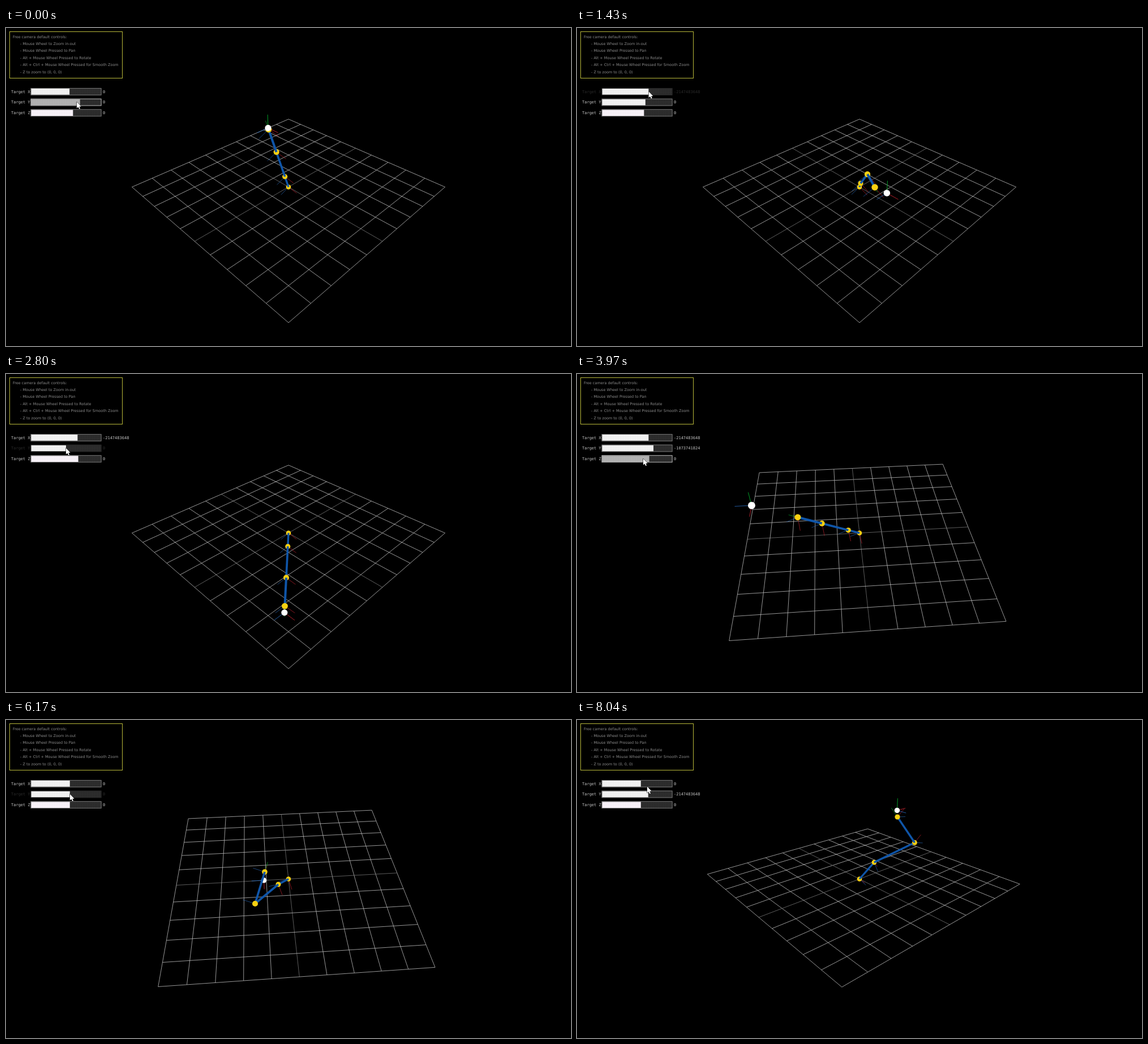
An HTML page with a canvas for the animation above (8.07 s loop, 998 by 561 pixels).

```html
<!DOCTYPE html>
<html lang="en">
<head>
<meta charset="utf-8">
<title>Robot arm reaching for a target</title>
<style>
  html, body { margin: 0; width: 100%; height: 100%; overflow: hidden; background: #000; }
  canvas { position: absolute; left: 0; top: 0; }
  span { position: absolute; white-space: pre; line-height: 10px; }
  .help { font: 6.5px/10px "DejaVu Sans", sans-serif; color: #8c8c8c; }
  .ui { font: 7px/10px "DejaVu Sans Mono", monospace; color: #c4c4c4; }
</style>
</head>
<body>
<canvas id="stage" width="998" height="561"></canvas>
<script>
const LOOP = 8070, W = 998, H = 561, UI = 0.62375;
const FOCAL = H / 2 / Math.tan(Math.PI / 8), DIST = Math.sqrt(300);
const LENGTHS = [1, 2, 1.5], RADIUS = 0.11;
const RGB = ['#d82834', '#00c832', '#2a6fc4'];
const ctx = document.getElementById('stage').getContext('2d');

// Camera: time, yaw, pitch (degrees)
const CAMERA = [
  [3430, 45, 35.26], [3500, 47, 40], [3600, 67, 44.4], [3720, 85.5, 44.8],
  [6400, 85.5, 44.8], [6640, 67, 26], [6860, -23, 10], [6970, -36.3, 21], [7120, -40.9, 26]
];

// Slider drags: row, then time and mouse offset along the slider
const START = [110, 140, 120];
const DRAGS = [
  [1, [[75, 130], [850, 35], [1120, 124], [1160, 124]]],
  [0, [[1250, 110], [1400, 133], [1600, 133]]],
  [2, [[1760, 120], [2080, 88], [2420, 135], [2480, 135]]],
  [1, [[2600, 124], [2800, 100], [3000, 76], [3270, 147], [3320, 147]]],
  [2, [[4020, 118], [4350, 178], [4700, 55], [4900, 111], [4960, 111]]],
  [0, [[5100, 133], [5600, 111], [5700, 111]]],
  [1, [[5950, 147], [6130, 111], [6190, 111], [6240, 104]]],
  [1, [[7430, 104], [7820, 132], [7880, 132]]]
];

// Pointer between drags: time, x, y
const FREE = [
  [0, 125, 130.5], [3430, 300, 260], [3500, 297, 268], [3600, 262, 276], [3720, 229, 277],
  [3960, 117, 149.5], [3985, 117, 149.5], [6400, 266, 300], [6640, 298, 267],
  [6860, 456, 239], [6970, 479.5, 258], [7120, 487, 267], [8020, 124, 117.6], [8070, 124, 117.6]
];

const rowTop = row => (170 + 30 * row) * UI;
const POINTER = FREE.concat(DRAGS.flatMap(([row, keys]) =>
  keys.map(([t, k]) => [t, (70 + k) * UI, rowTop(row) + 6]))).sort((a, b) => a[0] - b[0]);

const dot = (a, b) => a[0] * b[0] + a[1] * b[1] + a[2] * b[2];
const add = (a, b, s = 1) => a.map((v, i) => v + b[i] * s);
const mix = (a, b, s) => a.map((v, i) => v + (b[i] - v) * s);
const unit = a => { const n = Math.hypot(...a) || 1; return a.map(v => v / n); };

// Linear value of a key table, without the time column
function at(keys, t) {
  const i = keys.findIndex(k => k[0] > t);
  if (i === 0) return keys[0].slice(1);
  if (i < 0) return keys[keys.length - 1].slice(1);
  const a = keys[i - 1], b = keys[i];
  return mix(a, b, (t - a[0]) / (b[0] - a[0])).slice(1);
}

function cameraAt(t) {
  const [a, p] = at(CAMERA, t).map(v => v * Math.PI / 180);
  const sa = Math.sin(a), ca = Math.cos(a), s = Math.sin(p), c = Math.cos(p);
  return { right: [ca, 0, -sa], up: [-sa * s, c, -ca * s], back: [sa * c, s, ca * c] };
}

function project(cam, p) {
  const depth = DIST - dot(p, cam.back), k = FOCAL / depth;
  return { x: W / 2 + dot(p, cam.right) * k, y: H / 2 - dot(p, cam.up) * k, depth, k };
}

// Link directions of an arm seen at the given screen points; side 1 is toward the viewer
function poseFrom(t, points) {
  const cam = cameraAt(t), eye = cam.back.map(v => v * DIST);
  let joint = [0, 0, 0];
  return points.map(([x, y, side], i) => {
    const ray = unit(cam.right.map((r, n) =>
      r * (x - W / 2) / FOCAL - cam.up[n] * (y - H / 2) / FOCAL - cam.back[n]));
    const from = add(eye, joint, -1), b = dot(from, ray);
    const disc = Math.max(0, b * b - dot(from, from) + LENGTHS[i] ** 2);
    const dir = unit(add(from, ray, -b - side * Math.sqrt(disc)));
    joint = add(joint, dir, LENGTHS[i]);
    return dir;
  });
}

const near = poseFrom(1430, [[501, 274, 1], [513, 258, 1], [526, 281, 1]]);
const folded = poseFrom(6170, [[481, 290, 1], [440, 324, 1], [457, 268, -1]]);
const flat = poseFrom(6970, [[534, 264, 1], [609, 237, 1], [560, 268, 1]]);
const raised = poseFrom(8040, [[525, 251, 1], [597, 216, 1], [566, 171, 1]]);
const POSES = [[1430, near], [1800, near], [1900, folded], [6200, folded],
  [6900, flat], [7450, flat], [7950, raised]].map(([t, p]) => [t, ...p.flat()]);
const BEND = [[1150, 0], [1400, 1], [1520, 1], [1780, 0], [4900, 0], [5650, 1]];

function slidersAt(t) {
  const k = START.slice();
  let pressed = -1;
  for (const [row, keys] of DRAGS) {
    if (t < keys[0][0]) break;
    k[row] = Math.round(at(keys, t)[0]);
    if (t < keys[keys.length - 1][0]) pressed = row;
  }
  return { k, pressed };
}

const valueOf = k => Math.fround(Math.fround(k * 20 / 200) - 10);

// A float printed as an integer shows only the low mantissa bits
const bits = new DataView(new ArrayBuffer(8));
function misprint(value) {
  bits.setFloat64(0, value);
  return String(bits.getInt32(4));
}

function line(a, b, color, width) {
  ctx.strokeStyle = color;
  ctx.lineWidth = width;
  ctx.beginPath();
  ctx.moveTo(a.x, a.y);
  ctx.lineTo(b.x, b.y);
  ctx.stroke();
}

function drawGrid(cam) {
  for (let i = -5; i <= 5; i++) {
    const color = i ? '#bdbdbd' : '#747474';
    line(project(cam, [i, 0, -5]), project(cam, [i, 0, 5]), color, 0.8);
    line(project(cam, [-5, 0, i]), project(cam, [5, 0, i]), color, 0.8);
  }
}

function drawAxes(cam, origin, axes, width) {
  axes.forEach((axis, i) =>
    line(project(cam, origin), project(cam, add(origin, axis, 0.5)), RGB[i], width));
}

// Axes turned by the shortest arc from +y to d
function turned([x, y, z]) {
  const n = Math.max(0.01, 1 + y);
  return [[1 - x * x / n, -x, -x * z / n], [x, y, z], [-x * z / n, -z, 1 - z * z / n]];
}

function drawArm(cam, t, target) {
  const pose = at(POSES, t), bend = at(BEND, t)[0], aim = unit(target);
  const dirs = LENGTHS.map((_, i) =>
    unit(mix(aim, unit(pose.slice(i * 3, i * 3 + 3)), bend)));
  const joints = [[0, 0, 0]];
  dirs.forEach((d, i) => joints.push(add(joints[i], d, LENGTHS[i])));

  joints.forEach((j, i) => drawAxes(cam, j, turned(dirs[Math.min(i, 2)]), 0.6));
  drawAxes(cam, target, [[1, 0, 0], [0, 1, 0], [0, 0, 1]], 0.8);

  const solids = [];
  const ball = (p, color) => {
    const s = project(cam, p);
    solids.push({ depth: s.depth, draw() {
      ctx.fillStyle = color;
      ctx.beginPath();
      ctx.arc(s.x, s.y, RADIUS * s.k, 0, 7);
      ctx.fill();
    } });
  };
  joints.forEach(j => ball(j, '#f8d012'));
  ball(target, '#ffffff');
  dirs.forEach((_, i) => {
    const a = project(cam, joints[i]), b = project(cam, joints[i + 1]);
    const depth = (a.depth + b.depth) / 2;
    solids.push({ depth, draw: () => line(a, b, '#0f55a8', 0.085 * FOCAL / depth) });
  });
  solids.sort((a, b) => b.depth - a.depth).forEach(s => s.draw());
}

function dots(base, mark) {
  const c = document.createElement('canvas');
  c.width = c.height = 3;
  const g = c.getContext('2d');
  g.fillStyle = base;
  g.fillRect(0, 0, 3, 3);
  g.fillStyle = mark;
  g.fillRect(1, 1, 1, 1);
  return ctx.createPattern(c, 'repeat');
}
const TRACK = dots('#2e2e2e', '#1c1c1c');
const FILL = dots('#f2f2f2', '#e2e2e2');
const FILL_Z = dots('#f8f2f8', '#ebe4ee');
const HOVER = dots('#b2b2b2', '#a2a2a2');

function drawSlider(row, k, hover, pressed) {
  const x = 70 * UI, y = rowTop(row), w = 200 * UI, h = 20 * UI;
  ctx.fillStyle = TRACK;
  ctx.fillRect(x, y, w, h);
  ctx.fillStyle = hover ? HOVER : row === 2 ? FILL_Z : FILL;
  ctx.fillRect(x + 0.6, y + 0.8, k * 0.99 * UI, h - 1.6);
  ctx.strokeStyle = pressed ? '#242424' : hover ? '#c8c8c8' : '#808080';
  ctx.lineWidth = 0.9;
  ctx.strokeRect(x + 0.3, y + 0.3, w - 0.6, h - 0.6);
}

function drawPointer(x, y) {
  const shape = [[0, 0], [0, 11], [2.5, 8.8], [4.3, 12.6], [6.1, 11.8], [4.4, 8.2], [7.7, 8]];
  ctx.beginPath();
  shape.forEach(([dx, dy]) => ctx.lineTo(x + dx, y + dy));
  ctx.closePath();
  ctx.fillStyle = '#fff';
  ctx.strokeStyle = '#000';
  ctx.lineWidth = 1;
  ctx.stroke();
  ctx.fill();
}

function label(text, x, y, cls) {
  const el = document.createElement('span');
  el.className = cls;
  el.textContent = text;
  el.style.left = x + 'px';
  el.style.top = y + 'px';
  document.body.append(el);
  return el;
}

['Free camera default controls:', '- Mouse Wheel to Zoom in-out', '- Mouse Wheel Pressed to Pan',
  '- Alt + Mouse Wheel Pressed to Rotate', '- Alt + Ctrl + Mouse Wheel Pressed for Smooth Zoom',
  '- Z to zoom to (0, 0, 0)'].forEach((s, i) => label(s, i ? 25 : 12, 10.5 + i * 12.45, 'help'));
const names = ['X', 'Y', 'Z'].map((n, i) => label('Target ' + n, 9, rowTop(i) + 1.5, 'ui'));
const values = [0, 1, 2].map(i => label('0', 171, rowTop(i) + 1.5, 'ui'));

function draw(t) {
  const cam = cameraAt(t), { k, pressed } = slidersAt(t), [px, py] = at(POINTER, t);
  ctx.fillStyle = '#000';
  ctx.fillRect(0, 0, W, H);
  drawGrid(cam);
  drawArm(cam, t, k.map(valueOf));

  ctx.fillStyle = '#000';
  ctx.fillRect(6, 6, 200, 83);
  ctx.strokeStyle = '#b8b83a';
  ctx.lineWidth = 1;
  ctx.strokeRect(6.5, 6.5, 199, 82);

  k.forEach((v, row) => {
    const top = rowTop(row), down = row === pressed;
    const hover = pressed < 0 && px > 43 && px < 169 && py >= top && py < top + 11;
    drawSlider(row, v, hover, down);
    values[row].textContent = misprint(valueOf(v));
    names[row].style.color = values[row].style.color = down ? '#2a2a2a' : '';
  });
  drawPointer(px, py);
}

const begin = performance.now();
function tick() {
  draw((performance.now() - begin) % LOOP);
  requestAnimationFrame(tick);
}
tick();
</script>
</body>
</html>
```
